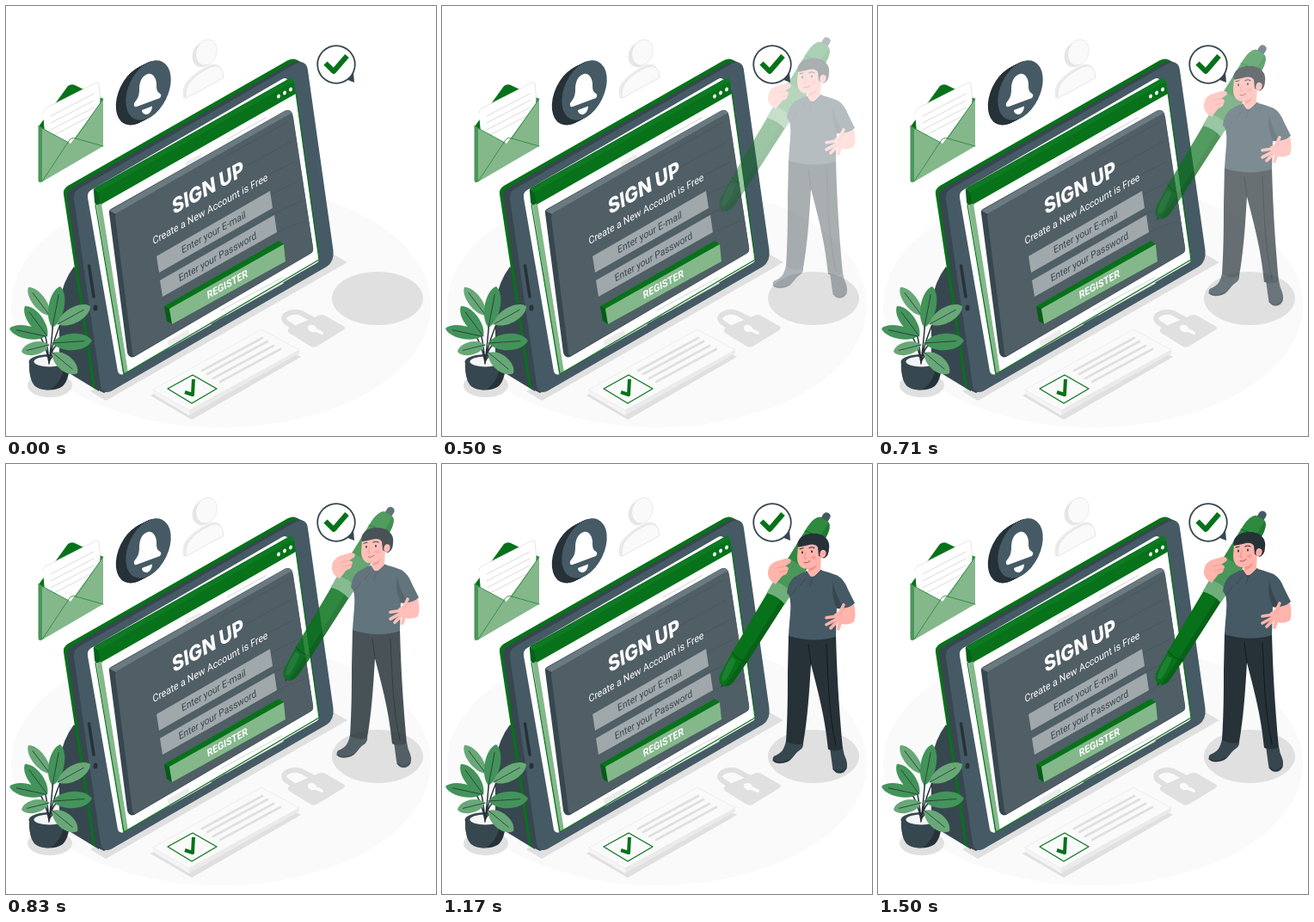
Animation, 500 px wide and 500 px high, one loop 1540 ms. Source, as an HTML page with a canvas:

```html
<!DOCTYPE html>
<html lang="en">
<head>
<meta charset="utf-8">
<title>Sign up</title>
<style>
html, body { margin: 0; width: 100%; height: 100%; overflow: hidden; background: #fff; }
canvas { display: block; width: 500px; height: 500px; }
</style>
</head>
<body>
<canvas id="stage"></canvas>
<script>
const SIZE = 500, LOOP = 1540, SLIDE = 1500, APPEAR = 170, DROP = 30;
const C = {
  green: '#07721a', mid: '#2f8a40', soft: '#84b88b', leaf: '#43935a', leafLight: '#68a877',
  slate: '#455a64', dark: '#37474f', ink: '#263238', skin: '#ffb4ac', blush: '#f78f88',
  grey: '#e0e0e0', pale: '#f5f5f5', floor: '#fafafa', white: '#fff'
};
const dpr = window.devicePixelRatio || 1;

function surface(canvas) {
  canvas.width = canvas.height = SIZE * dpr;
  const ctx = canvas.getContext('2d');
  ctx.scale(dpr, dpr);
  ctx.lineCap = ctx.lineJoin = 'round';
  return ctx;
}
const stage = surface(document.getElementById('stage'));
const scene = surface(document.createElement('canvas'));
const actor = surface(document.createElement('canvas'));
let g = scene;

function fill(color, path) {
  g.fillStyle = color;
  g.fill(new Path2D(path));
}
function line(color, width, path) {
  g.strokeStyle = color;
  g.lineWidth = width;
  g.stroke(new Path2D(path));
}
function oval(color, x, y, rx, ry, turn = 0) {
  g.fillStyle = color;
  g.beginPath();
  g.ellipse(x, y, rx, ry, turn, 0, Math.PI * 2);
  g.fill();
}
// Text lying in the plane of the tablet screen
function screenText(text, x, y, font, color) {
  g.save();
  g.transform(0.85, -0.478, 0.14, 0.98, x, y);
  g.font = font;
  g.fillStyle = color;
  g.textAlign = 'center';
  g.fillText(text, 0, 0);
  g.restore();
}
function leaf(x0, y0, x1, y1, width, color) {
  const dx = x1 - x0, dy = y1 - y0, n = width / Math.hypot(dx, dy);
  const side = s => [x0 + dx * 0.2 - dy * n * s, y0 + dy * 0.2 + dx * n * s,
    x0 + dx * 0.85 - dy * n * s, y0 + dy * 0.85 + dx * n * s];
  const [a, b, c, d] = side(1), [e, f, h, i] = side(-1);
  fill(color, `M${x0} ${y0} C${a} ${b} ${c} ${d} ${x1} ${y1} C${h} ${i} ${e} ${f} ${x0} ${y0}Z`);
  line(C.ink, 0.8, `M${x0} ${y0} L${x0 + dx * 0.8} ${y0 + dy * 0.8}`);
}

function drawFloor() {
  oval(C.floor, 250, 348, 244, 142);
  oval(C.grey, 432, 340, 53, 31);
  oval(C.grey, 51, 441, 26, 14);
  fill(C.grey, 'M98 448 L116 459 L397 298 L376 286Z');

  // Padlock
  line(C.grey, 6, 'M338 376 L326 368 C317 361 331 353 343 357 L360 366');
  fill(C.grey, 'M329 380 Q326 377 330 374 L363 360 Q367 358 371 360 L392 372 Q396 374 392 377 L361 396 Q357 398 353 395Z');
  oval(C.floor, 356, 375, 5.5, 4, 0.4);
  line(C.floor, 4, 'M358 376 L367 380');

  // Card
  fill(C.grey, 'M168 453 L294 382 L343 408 L216 481Z');
  fill('#ebebeb', 'M171 445 L213 469 L341 398 L341 404 L213 476 L171 451Z');
  fill(C.pale, 'M171 445 L213 469 V476 L171 451Z');
  fill(C.floor, 'M171 446 L297 376 L341 400 L213 470Z');
  line('#e8e8e8', 0.7, 'M171 446 L297 376 L341 400 L213 470Z');
  for (const [x, y] of [[228, 424], [234, 428], [241, 433], [249, 437]])
    line(C.grey, 2.8, `M${x} ${y} l70 -38`);
  line(C.green, 1.2, 'M188 445 L217 429 L245 445 L216 462Z');
  g.lineCap = 'butt';
  line(C.green, 4, 'M208 449 L217 452 L218 434');
  g.lineCap = 'round';
}

function drawTablet() {
  fill(C.dark, 'M79 303 Q66 320 62 345 L62 420 L108 448 L100 330Z');
  fill(C.green, 'M67 219 Q66 213 72 209 L328 63 Q334 60 339 63 L350 70 L120 447 L101 444Z');
  fill(C.dark, 'M71 222 Q70 216 76 212 L332 66 Q344 61 350 71 L376 290 L114 450 L104 445Z');
  fill(C.slate, 'M79 224 Q78 217 84 213 L337 67 Q349 62 351 75 L380.500 284 Q382 297 373 303 L122 448 Q112 452 110 441Z');
  line(C.ink, 3.5, 'M96.500 302 L102 338');
  oval(C.ink, 104, 351, 2.5, 3.5);

  // Screen and browser window
  fill(C.white, 'M95 223 Q94 217 99 214 L321 85 Q326 82 328 87 L364 292 Q365 297 361 299 L137 428 Q132 430 130 425Z');
  fill(C.soft, 'M105 230 L112 230 L142 426 L136 428Z');
  fill(C.white, 'M111 230 L337 101 L363.500 294 L142 425Z');
  line('#e4e6e7', 1.5, 'M257 155 L302 130 M190 397 L238 370 M250 354 L321 316 M256 359 L322 322');
  fill('#ececec', 'M187 390 L212 376 L214 384 L190 397Z M208 182 L226 172 L228 180 L210 190Z');
  line(C.green, 1.2, 'M337 101 L364 295 L137 428 L104 231');
  fill('#06601a', 'M102 216 Q101 213 104 211 L330 84 L337 101 L107 231 Q104 232 103 228Z');
  fill(C.green, 'M107 217 L335 88 L337 102 L110 231Z');
  fill('#0d7a22', 'M102 213 L330 84 Q334 83 335 88 L107 217Z');
  for (const i of [0, 1, 2]) oval(C.white, 317 + i * 7, 105 - i * 4, 1.9, 2.4, 0.4);

  // Sign-up panel
  fill(C.dark, 'M120 241 Q119 238 122 236 L324 122 Q330 119 333 125 L357 281 Q358 286 354 288 L149 408 Q143 410 141 403Z');
  fill('#6b7980', 'M120 238 L324 122 Q330 119 333 125 L128 242Z');
  fill('#505e66', 'M127 246 Q127 242 130 240 L329 126 Q333 124 334 129 L357 281 Q358 286 354 288 L151 406 Q147 408 147 403Z');
  for (let i = 0; i < 6; i++)
    line('#4a5860', 1.2, `M${250 + i * 13} ${178 + i * 17} L${327 + i * 4} ${135 + i * 23}`);

  screenText('SIGN UP', 236, 219.500, '800 24px Inter, sans-serif', C.white);
  screenText('Create a New Account is Free', 238, 240, '12px Roboto, sans-serif', C.white);
  fill('#a0a8ac', 'M175 291 L307 215 L310 235 L178 310Z M179 319 L312 243 L315 263 L182 338Z');
  screenText('Enter your E-mail', 242, 267, '11.7px Roboto, sans-serif', C.dark);
  screenText('Enter your Password', 246.500, 295.500, '11.6px Roboto, sans-serif', C.dark);

  fill(C.green, 'M184 349 L317 273 L323 277 L325 297 L193 370 L187 366Z');
  fill('#065c17', 'M184 349 L190 352 L193 370 L187 366Z');
  fill(C.soft, 'M190 352 L323 277 L325 297 L193 370Z');
  screenText('REGISTER', 258, 327.500, 'bold 12px Roboto, sans-serif', C.white);
}

function drawPlant() {
  fill(C.ink, 'M27 415 C27 428 29 437 34 442 C41 448 58 448 66 442 C72 436 74 425 74 415Z');
  fill(C.dark, 'M27 415 C27 428 29 437 34 442 Q42 447 52 446 Q66 436 68 415Z');
  oval(C.dark, 50.500, 414, 24, 9);
  oval(C.pale, 50.500, 413.500, 18, 6);
  line(C.ink, 1.5, 'M50 416 Q53 390 55 366 M50 416 Q48 388 44 378 M50 416 Q52 396 65 366 M50 414 Q54 394 64 391 M50 414 Q46 392 38 382 M50 414 Q54 404 62 407');
  leaf(51, 360, 26, 327, 10, C.leafLight);
  leaf(54, 374, 63, 326, 12, C.leaf);
  leaf(48, 384, 22, 349, 11, C.leaf);
  leaf(60, 370, 98, 349, 12, C.leafLight);
  leaf(46, 384, 4, 375, 10, C.leaf);
  leaf(54, 392, 100, 389, 13, C.leaf);
  leaf(50, 394, 18, 402, 10, C.leafLight);
  leaf(54, 403, 83, 427, 12, C.leafLight);
}

function drawIcons() {
  // Envelope
  fill(C.green, 'M38 140 L72 93 Q76 90 80 92 L113 108 L75 165Z');
  fill(C.white, 'M43 124 Q43 121 46 119 L105 89 Q108 88 108 91 L112 150 L48 182Z');
  line(C.grey, 0.8, 'M43 124 Q43 121 46 119 L105 89 Q108 88 108 91 L110 110');
  for (let i = 0; i < 4; i++) line('#dcdcdc', 1, `M52 ${128 + i * 8} L102 ${102 + i * 8}`);
  fill(C.soft, 'M38 140 L75 160 L113 108 V163 L41 205 Q38 206 38 203Z');
  line(C.mid, 0.9, 'M38 140 L73 159 M113 108 L81 154 M42 204 L73 157 Q76 152 81 154 L113 163');
  fill('#4a965a', 'M37.500 139 L42 142 V204 Q38 206 37.500 203Z');

  // Bell badge, with the rim swept back from its face
  for (let i = 12; i > 0; i--) oval(C.ink, 165.500 - i * 0.96, 98 + i * 0.48, 23, 37, 0.45);
  oval(C.slate, 165.500, 98, 23, 37, 0.45);
  fill(C.white, 'M165 79 C158 81 155 88 155 97 C155 106 152 109 149 113 Q148 118 152 117 L179 107 Q182 103 178 101 C175 99 175 95 175 90 C174 82 170 78 165 79Z');
  fill(C.white, 'M158 121 L170 116.500 C170 122 166 127 162 126 Q158 125 158 121Z');

  // User
  const body = 'M209 107 Q208 94 215 87 Q223 78 238 71 Q252 66 253 83Z';
  fill('#ebebeb', 'M206 107 Q204 93 212 86 Q220 77 235 69 Q244 66 249 70 L253 83 L209 107Z');
  fill(C.floor, body);
  line(C.grey, 0.8, body);
  oval('#e6e6e6', 229, 56.500, 12, 15, 0.35);
  oval(C.grey, 233, 54, 12, 15.500, 0.35);
  oval(C.floor, 233, 54, 11.400, 14.900, 0.35);
}

function drawBubble() {
  fill(C.dark, 'M404 77 L405 89 L395 85Z');
  oval(C.dark, 384, 68, 22.700, 22.700);
  oval(C.white, 384, 68, 20.900, 20.900);
  g.lineCap = 'butt';
  line(C.green, 6, 'M371.500 66.500 L381 76 L396.500 58');
  g.lineCap = 'round';
}

// Pen axis runs from the nib along +x
function drawPen() {
  g.save();
  g.translate(325, 257);
  g.rotate(Math.atan2(-201, 124));
  fill(C.slate, 'M222 -4.500 H233 Q237 -4 237 0 Q237 4 233 4.500 H222Z');
  fill(C.ink, 'M-1 0 L6 -3 V3Z');
  fill(C.green, 'M2 -3 Q5 -8 13 -9 L42 -10.500 L128 -12 V12 L42 10.500 L13 9 Q5 8 2 3Z');
  fill('#066216', 'M2 3 Q5 8 13 9 L42 10.500 L128 12 V6 L42 5Z');
  fill('#1c8030', 'M6 -4 Q20 -9 35 -8 V-2 Q20 1 8 0Z');
  line('#05500f', 1, 'M40 -10.500 Q36 0 40 10.500');
  fill(C.mid, 'M128 -12.500 H210 Q224 -12 228 -6 V6 Q224 12 210 12.500 H128Z');
  fill('#1f7b31', 'M165 6 H228 Q224 12 210 12.500 H165Z');
  fill('#4a975a', 'M134 -12.500 H168 V12.500 H134Z');
  line(C.green, 1, 'M205 -12.500 Q209 0 205 12.500');
  fill('#6fae7b', 'M120 -12.500 H136 Q140 0 136 12.500 H120 Q124 0 120 -12.500Z');
  g.restore();
}

function drawPerson() {
  // Shoes and trousers
  fill(C.dark, 'M400 320 L420 321 Q421 328 416 331 C409 335 408 344 397 346 C387 348 382 343 386 338 C396 334 398 329 400 320Z');
  fill(C.dark, 'M451 328 H466 Q467 336 470 342 Q473 351 468 356 C463 360 455 358 454 350Z');
  line(C.ink, 1.2, 'M385 343 Q394 348 404 342 M455 353 Q462 360 470 352');
  fill(C.ink, 'M403 196 H458 C459 235 461 275 466 329 Q458 334 449 330 C445 290 437 262 429 231 C427 265 425 295 420 323 Q410 327 400 321 C402 290 402 265 402 240Z');
  line('#11191d', 1, 'M429 231 L426 208 M447 208 C449 250 450 290 458 326');

  // Hand around the pen
  fill(C.skin, 'M379 127 Q378 117 387 112 L400 108 Q408 108 405 113 L399 117 Q405 118 402 122 Q402 127 396 128 L388 138 Q380 134 379 127Z');
  line(C.blush, 0.8, 'M399 117 L390 119 M402 122 L392 124');

  // Torso
  fill(C.slate, 'M420 124 L438 121 Q450 124 460 128 Q468 133 472 144 L480 160 Q473 168 459 166 L458 199 Q432 207 403 198 C404 176 407 164 404 152 L401 148 Q402 137 409 130Z');
  fill(C.dark, 'M455 136 Q452 150 459 166 Q463 167 467 166 Q457 150 455 136Z');
  line(C.dark, 0.8, 'M424 130 L417 139 M404 152 Q411 147 412 142');

  // Open hand
  fill(C.skin, 'M467 166 Q475 165 479 161 Q482 174 479 182 Q472 186 465 184 L457 180 L456 173Z');
  line(C.skin, 3.600, 'M460 175 L447 177 M460 178 L447 185 M461 180 L452 189 M464 181 L461 190 M462 172 L467 162');
  line(C.blush, 0.7, 'M458 181 L453 185 M462 183 L460 187 M466 168 L463 173');

  // Head
  fill(C.skin, 'M425 112 L441 104 L440 122 Q434 132 425 128Z');
  fill(C.blush, 'M427 119 Q434 117 437 111 Q436 121 427 123Z');
  fill(C.slate, 'M423 122 L430 132 L441 121 L445 126 L433 137 L422 131Z');
  line(C.dark, 0.8, 'M424 123 L430 132 L441 122 M430 133 L428 140');
  fill(C.skin, 'M414 92 C414 99 412 108 414 113 Q417 121 426 120 Q436 118 440 109 L443 92 L430 86Z');
  fill(C.ink, 'M414 95 C411 86 421 78 433 79 C445 79 452 88 450 97 Q450 105 444 108 L438 105 L437 95 Q434 91 428 92 Q420 94 414 95Z');
  oval(C.skin, 443, 102.500, 3.500, 4.500, 0.25);
  line(C.blush, 0.8, 'M442 104 Q443 101 445 101');
  oval(C.ink, 419, 101, 1, 1.500);
  oval(C.ink, 430, 100, 1, 1.500);
  line(C.ink, 1.1, 'M416 97 L420 96 M427 96 Q430 94 433 96');
  line(C.blush, 1, 'M423 101 L421 108 L424 108');
  oval('#ff9c95', 432, 107, 3, 2);
  line('#b64e4c', 1, 'M421 113 Q425 114 428 111');
}

// One coordinate of a cubic Bézier from 0 to 1 with inner controls a and b
const bezier = (u, a, b) => 3 * u * (1 - u) ** 2 * a + 3 * u * u * (1 - u) * b + u ** 3;
function ease(x) {
  if (x >= 1) return 1;
  let low = 0, high = 1;
  for (let i = 0; i < 24; i++) {
    const u = (low + high) / 2;
    if (bezier(u, 0.36, 0.5) < x) low = u; else high = u;
  }
  return bezier(low, -0.01, 1.38);
}

function frame(now) {
  const t = now % LOOP;
  stage.clearRect(0, 0, SIZE, SIZE);
  stage.drawImage(scene.canvas, 0, 0, SIZE, SIZE);
  if (t >= APPEAR) {
    const p = ease(t / SLIDE);
    g = actor;
    g.clearRect(0, 0, SIZE, SIZE);
    g.save();
    g.translate(0, DROP * (p - 1));
    drawPen();
    drawPerson();
    g.restore();
    stage.globalAlpha = Math.max(0, Math.min(1, p));
    stage.drawImage(actor.canvas, 0, 0, SIZE, SIZE);
    stage.globalAlpha = 1;
  }
  g = stage;
  drawBubble();
  requestAnimationFrame(frame);
}

scene.fillStyle = C.white;
scene.fillRect(0, 0, SIZE, SIZE);
drawFloor();
drawTablet();
drawPlant();
drawIcons();
frame(performance.now());
</script>
</body>
</html>
```
